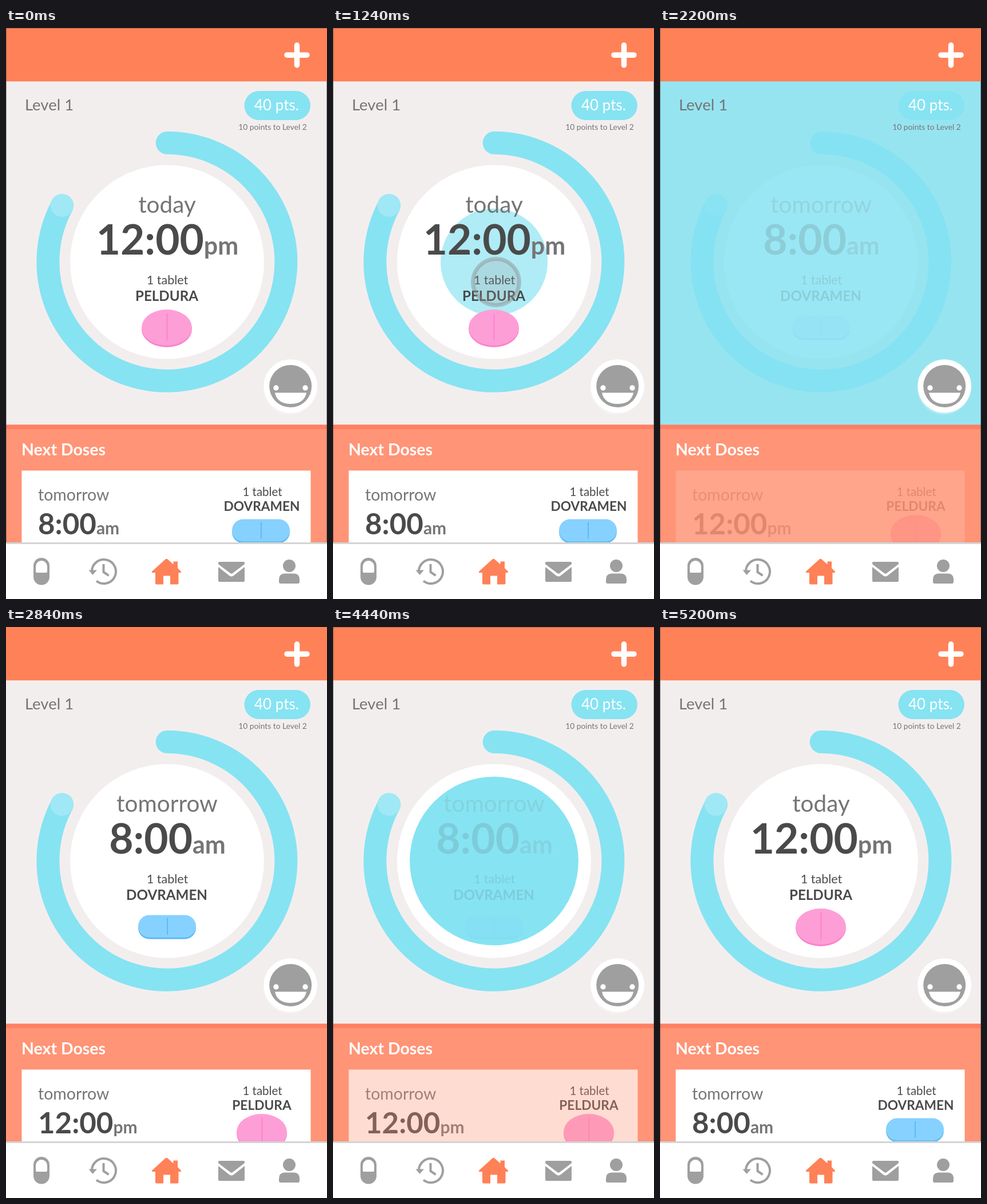
Recreate the animation shown at these times as an HTML page. Size 561x998 px, loop 5.76 s.

```html
<!DOCTYPE html>
<html lang="en">
<head>
<meta charset="utf-8">
<title>Dose reminder</title>
<style>
  html, body { margin: 0; width: 100%; height: 100%; overflow: hidden; background: #fff; }
  svg { display: block; width: 100%; height: 100%; }
  text { font-family: Lato, "Open Sans", sans-serif; fill: #757575; }
  .mid { text-anchor: middle; }
  .bold { font-weight: 700; }
  .dark { fill: #4a4a4a; }
  .white { fill: #fff; }
  .icon { fill: #9f9f9f; }
</style>
</head>
<body>
<svg viewBox="0 0 561 998" preserveAspectRatio="none">
  <defs>
    <clipPath id="panel"><rect y="93" width="561" height="601"/></clipPath>
    <clipPath id="doses"><rect y="701" width="561" height="198"/></clipPath>
    <g id="oval">
      <ellipse cy="3" rx="44" ry="31.5" fill="#fb82cc"/>
      <ellipse rx="44" ry="31.5" fill="#fe9ed7"/>
      <path d="M.5-25V23" stroke="#fb82cc" stroke-width="2"/>
    </g>
    <g id="caplet">
      <rect x="-50.5" y="-17" width="101" height="39" rx="19.5" fill="#5fbaf5"/>
      <rect x="-50.5" y="-20" width="101" height="39" rx="19.5" fill="#86d1ff"/>
      <path d="M.5-15V14" stroke="#5fbaf5" stroke-width="2"/>
    </g>
  </defs>

  <rect width="561" height="998" fill="#fff"/>
  <rect y="93" width="561" height="601" fill="#f3eeee"/>

  <g clip-path="url(#panel)">
    <path d="M281.700 200.800A208 208 0 1 1 98.200 310.300" fill="none" stroke="#86e3f2" stroke-width="40" stroke-linecap="round"/>
    <circle cx="97.8" cy="310" r="20" fill="#a0e8f5"/>
    <circle cx="281.5" cy="409" r="169.5" fill="#fff"/>
    <circle id="disc" cx="281.5" cy="409" r="0" fill="#86e3f2"/>
    <g id="main"></g>
  </g>

  <text x="33" y="144" font-size="27.5">Level 1</text>
  <rect x="416.5" y="110" width="115.5" height="51" rx="25.5" fill="#86e3f2"/>
  <text class="mid white" x="473" y="144" font-size="26">40 pts.</text>
  <text class="mid" x="466" y="178" font-size="13.8">10 points to Level 2</text>

  <circle cx="496" cy="630" r="46" fill="#fff" opacity=".2"/>
  <circle cx="497.2" cy="626" r="46.8" fill="#fff"/>
  <circle class="icon" cx="497.2" cy="626" r="37"/>
  <g class="white">
    <circle cx="472" cy="629" r="4.7"/>
    <circle cx="523" cy="629" r="4.7"/>
    <path d="M470 637.500H525Q521 657 497.500 657T470 637.500Z"/>
  </g>

  <rect width="561" height="93.3" fill="#ff8157"/>
  <path d="M508.500 30V65M491 47.200H526" stroke="#fff" stroke-width="9.500" stroke-linecap="round"/>

  <rect y="693.5" width="561" height="205.5" fill="#ff9476"/>
  <rect y="693.5" width="561" height="7.5" fill="#ff7f63"/>
  <text class="bold white" x="27" y="747" font-size="28.5">Next Doses</text>
  <g clip-path="url(#doses)"><g id="card"></g></g>

  <path id="edge" d="M.5 0V899M560.500 93V899M0 .25H561" fill="none" stroke="#444" stroke-opacity=".5"/>

  <rect y="899" width="561" height="99" fill="#fff"/>
  <rect y="899" width="561" height="3" fill="#d4d4d4"/>
  <g class="icon">
    <rect x="48" y="926" width="28" height="47.5" rx="14"/>
    <path class="white" d="M52 950V941A10 10 0 0 1 72 941V950Q72 952 70 952H54Q52 952 52 950Z"/>
    <path d="M150 950A21 21 0 1 1 158 966.500" fill="none" stroke="#9f9f9f" stroke-width="4"/>
    <path d="M144.500 947.500H159L151.500 956Z"/>
    <path d="M170.500 937V951L179.500 957" fill="none" stroke="#9f9f9f" stroke-width="4"/>
    <path d="M371 937V935Q371 933 373 933H415Q417 933 417 935V937L396 953Q394 954.500 392 953ZM371 942L390 957Q394 960 398 957L417 942V966Q417 968 415 968H373Q371 968 371 966Z"/>
    <circle cx="495" cy="940" r="11"/>
    <path d="M477 968V964Q477 953.500 487 953.500H503Q513 953.500 513 964V968Q513 971 510 971H480Q477 971 477 968Z"/>
  </g>
  <path d="M255.500 949.500L278 929Q280.500 926.500 283 929L292.500 937.500V932.500H300V944L305.500 949.500Q307.500 952 304.500 952H301.500V970Q301.500 972.500 299 972.500H287V957.500H275V972.500H263.500Q261 972.500 261 970V952H256.500Q253.500 952 255.500 949.500Z" fill="#ff8157"/>

  <circle id="touch" r="40.5" fill="#969696" fill-opacity=".22" stroke="#858585" stroke-opacity=".42" stroke-width="7"/>
</svg>

<script>
const $ = id => document.getElementById(id);
const disc = $('disc'), main = $('main'), card = $('card'), touch = $('touch'), edge = $('edge');

const LOOP = 5760, HALF = 2680, STEP = 40, SWAP = 2140;
const doses = [
  { day: 'today', hour: '12:00', half: 'pm', name: 'PELDURA', pill: 'oval', big: [281, 523.5], small: [447, 882.5] },
  { day: 'tomorrow', hour: '8:00', half: 'am', name: 'DOVRAMEN', pill: 'caplet', big: [281.5, 523.5], small: [445.5, 878.5] }
];
const taps = [[285, 444], [258.5, 447]];

const pillAt = (d, [x, y]) => `<use href="#${d.pill}" x="${x}" y="${y}"/>`;
const clock = (d, size) => `${d.hour}<tspan fill="#757575" font-size="${size}">${d.half}</tspan>`;

const mainView = d => `
  <text class="mid" x="281.5" y="323" font-size="40.5">${d.day}</text>
  <text class="mid bold dark" x="282" y="396" font-size="73">${clock(d, 43)}</text>
  <text class="mid dark" x="282" y="448" font-size="21.5">1 tablet</text>
  <text class="mid bold dark" x="281" y="476.5" font-size="24.2">${d.name}</text>
  ${pillAt(d, d.big)}`;

const cardView = d => `
  <rect x="27.5" y="773.5" width="505" height="140" fill="#fff"/>
  <text x="56" y="826" font-size="28.5">tomorrow</text>
  <text class="bold dark" x="56" y="885" font-size="51">${clock(d, 30)}</text>
  <text class="mid dark" x="448" y="818" font-size="20.5">1 tablet</text>
  <text class="mid bold dark" x="447" y="844" font-size="22.7">${d.name}</text>
  ${pillAt(d, d.small)}`;

const ramp = (t, from, to) => Math.min(1, Math.max(0, (t - from) / (to - from)));
const easeOut = (p, n = 2) => 1 - (1 - p) ** n;

function radius(t) {
  if (t < 960) return 0;
  if (t < 1520) return 44 + 81.5 * easeOut(ramp(t, 960, 1520), 1.35);
  return 125.5 + 220.5 * ((Math.min(t, 2160) - 1520) / 480) ** 3.33;
}

let shown = -1;
function show(index) {
  if (index === shown) return;
  shown = index;
  main.innerHTML = mainView(doses[index]);
  card.innerHTML = cardView(doses[1 - index]);
}

function draw(time) {
  const second = time >= 2900 ? 1 : 0;
  const t = time - second * HALF;
  const swapped = t >= SWAP;
  const reveal = easeOut(ramp(t, 2160, second ? 2520 : 2640));
  show(swapped ? 1 - second : second);

  disc.setAttribute('r', radius(t));
  disc.setAttribute('opacity', swapped ? 1 - reveal : 0.66 + 0.34 * ramp(t, 1520, 1760));
  main.setAttribute('opacity', swapped ? reveal : 1 - ramp(t, 1520, 1800));
  card.setAttribute('opacity', swapped ? reveal : 1 - ramp(t, 1640, 2008));

  const [x, y] = taps[second];
  const e = easeOut(ramp(t, 360, 920));
  touch.setAttribute('cx', x - 11 * (1 - e) + 7.5 * Math.sin(Math.PI * e));
  touch.setAttribute('cy', y - 42 * (1 - e));
  touch.setAttribute('opacity', ramp(t, 360, 520) * (1 - ramp(t, 1440, 1600)));

  edge.setAttribute('visibility', time >= 2760 && time < 3040 ? 'hidden' : 'visible');
}

const start = performance.now();
function tick() {
  const time = (performance.now() - start) % LOOP;
  draw(Math.floor(time / STEP) * STEP);
  requestAnimationFrame(tick);
}
tick();
</script>
</body>
</html>
```
